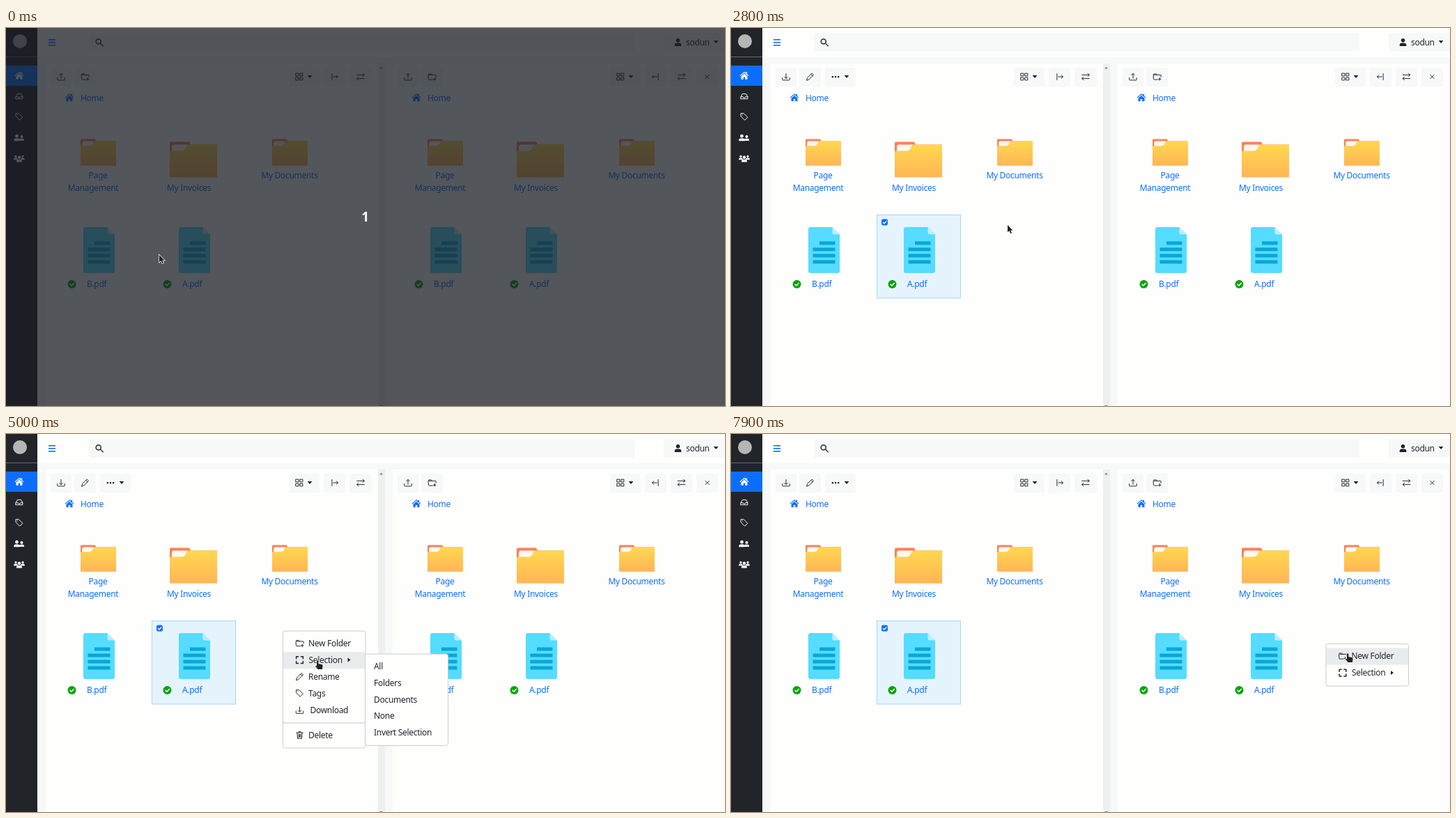
An HTML page for the animation above (8 s loop, 1032x543 px).

```html
<!DOCTYPE html>
<html lang="en">
<head>
<meta charset="utf-8">
<title>File browser</title>
<style>
  html, body { margin: 0; width: 100%; height: 100%; overflow: hidden; background: #fefefd; }
  svg { display: block; width: 100%; height: 100%; }
  text { font: 12px "Noto Sans", "Open Sans", sans-serif; letter-spacing: -.3px; }
  .count { font-size: 19px; font-weight: 600; }
</style>
</head>
<body>
<svg id="stage" viewBox="0 0 1032 543"></svg>
<script>
const LOOP = 8000, STEP = 100;
const BLUE = '#0d6efd', INK = '#212529', WHITE = '#fefefd', PALE = '#f7f8f8';
const PANEL_SHIFT = 498;

// Outline icons on a 16-unit grid
const LINES = {
  upload: 'M1 10v3.5q0 1 1 1h12q1 0 1-1V10M8 11V2M5 4.8l3-3 3 3',
  download: 'M1 10v3.5q0 1 1 1h12q1 0 1-1V10M8 2v9M5 8.5l3 3 3-3',
  folderPlus: 'M9 13.5H2.5q-1 0-1.2-1L.8 5.5q0-1 1-1h13q1 0 .9 1l-.3 3M1.2 4.2V3.5q0-1 1-1h4l2 2M13 10v5M10.5 12.5h5',
  grid: 'M1.5 1.5h5v5h-5zM9.5 1.5h5v5h-5zM1.5 9.5h5v5h-5zM9.5 9.5h5v5h-5z',
  barRight: 'M2.5 2v12M5 8h9M11 5l3 3-3 3',
  barLeft: 'M13.5 2v12M11 8H2M5 5L2 8l3 3',
  swap: 'M1 11.5h14M4 8.5l-3 3 3 3M15 4.5H1M12 1.5l3 3-3 3',
  close: 'M4.5 4.5l7 7M11.5 4.5l-7 7',
  pencil: 'M1.5 14.5l1.3-4.5L11.5 1.3l3.2 3.2L6 13.2zM9.5 3.3l3.2 3.2',
  tag: 'M1.5 2v5l7.5 7.5 5.5-5.5L7 1.5H2zM4.5 4.5h.3',
  corners: 'M1.5 5.5v-4h4M10.5 1.5h4v4M14.5 10.5v4h-4M5.5 14.5h-4v-4',
  trash: 'M1.5 3.5h13M6 3V1.5h4V3M3.3 4l.7 10.5h8L12.7 4M6 6.5V12M8 6.5V12M10 6.5V12',
  inbox: 'M1.5 9h4q.5 2 2.5 2t2.5-2h4M1.5 9l3-5.5h7l3 5.5v4h-13z',
  search: 'M11 6.5a4.7 4.7 0 1 0-9.4 0a4.7 4.7 0 0 0 9.4 0M10 10l5 5',
  check: 'M4 8.5l3 3 5.5-6'
};
const SOLIDS = {
  home: 'M8 1.5L0 8.5l1 1 7-6 7 6 1-1-3-2.6V2h-2v2zM8 5L2.5 9.8V15h4v-4h3v4h4V9.8z',
  user: 'M8 8a4 4 0 1 0 0-8a4 4 0 0 0 0 8zM1 16v-2q0-4.5 4.5-4.5h5q4.5 0 4.5 4.5v2z',
  caret: 'M3 5h10l-5 6z',
  dots: 'M1 6.5h3v3H1zM6.5 6.5h3v3h-3zM12 6.5h3v3h-3z'
};

const rect = (x, y, w, h, fill, extra = '') =>
  `<rect x="${x}" y="${y}" width="${w}" height="${h}" fill="${fill}" ${extra}/>`;
const path = (d, fill, extra = '') => `<path d="${d}" fill="${fill}" ${extra}/>`;
const at = (x, y, body, scale = 1) => `<g transform="translate(${x} ${y}) scale(${scale})">${body}</g>`;
const label = (x, y, text, fill = INK, anchor = 'start') =>
  `<text x="${x}" y="${y}" fill="${fill}" text-anchor="${anchor}">${text}</text>`;

// Icon centred on x, y
function icon(name, x, y, color = INK, size = 12, weight = 1.3) {
  const s = size / 16;
  const shape = SOLIDS[name] ? path(SOLIDS[name], color)
    : path(LINES[name], 'none', `stroke="${color}" stroke-width="${weight}" stroke-linecap="round" stroke-linejoin="round"`);
  return at(x - size / 2, y - size / 2, shape, s);
}

const button = (x, w, ...icons) => rect(x, 57, w, 27, PALE, 'rx="3"') +
  icons.map(([name, cx]) => icon(name, cx, 70, INK, name === 'caret' ? 11 : 12)).join('');

const folder = (x, y, scale) => at(x, y,
  path('M0 2q0-2 2-2h25q2 0 2.6 4H68V20H0z', '#fd8157') +
  path('M3 16V6l2-2h21v8z', '#fff8f2') +
  path('M0 15q0-2 2-2h15q4 0 6-4l1-3q1-2 4-2h40V51H0z', 'url(#gold)'), scale);

const file = (x, name) => at(x, 286,
  path('M3 0h31.500l10.500 10.500V63q0 3-3 3H3q-3 0-3-3V3q0-3 3-3z', '#55dcfe') +
  path('M34.500 0l10.500 10.500h-8q-2.500 0-2.500-2.500z', '#b9effd') +
  rect(16, 20.5, 22.5, 5, '#09a7d6') +
  [29.5, 38.5, 47.5].map(y => rect(6.5, y, 32, 5, '#09a7d6')).join('')) +
  `<circle cx="${x - 16.5}" cy="368" r="6" fill="#0aa30d"/>` +
  icon('check', x - 16.5, 368, WHITE, 10, 2.4) +
  label(x + 5, 371.5, name, BLUE);

function highlight(x, hovered, checked) {
  if (!hovered && !checked) return '';
  const [fill, edge] = hovered ? ['#d0ecfc', '#7cc0ec'] : ['#e5f3fd', '#a6d8f2'];
  return rect(x + .5, 268.5, 120, 119.5, fill, `stroke="${edge}"`) +
    rect(x + 7.5, 275, 8, 8, checked ? BLUE : WHITE, `rx="1.5" stroke="${checked ? BLUE : '#777'}"`) +
    (checked ? icon('check', x + 11.5, 279, WHITE, 9, 2.4) : '');
}

const contents = () =>
  icon('home', 91, 99.5, BLUE, 13) + label(107, 104.5, 'Home', BLUE) +
  folder(107, 159.5, .75) + folder(235, 163.5, 1) + folder(382, 159.5, .75) +
  label(132, 216, 'Page', BLUE, 'middle') + label(125, 234, 'Management', BLUE, 'middle') +
  label(262.5, 234, 'My Invoices', BLUE, 'middle') + label(407, 216, 'My Documents', BLUE, 'middle') +
  file(111, 'B.pdf') + file(248, 'A.pdf');

const createTools = button(64, 30, ['upload', 79]) + button(98, 31, ['folderPlus', 113.5]);
const selectionTools = button(64, 30, ['download', 79]) + button(98, 31, ['pencil', 113.5]) +
  button(135, 44, ['dots', 150], ['caret', 166]);

const frame = rect(0, 0, 1032, 543, PALE) +
  rect(45, 0, 987, 42, WHITE) + rect(57, 51, 477, 492, WHITE) + rect(555, 51, 475, 492, WHITE) +
  rect(534, 51, 10, 492, '#eeefef') + path('M536 58.500h5l-2.500-3zM536.500 542h4v1h-4z', '#888') +
  rect(0, 0, 45, 543, INK) + rect(0, 41, 45, 1, '#64676a') + rect(0, 54, 45, 29, BLUE) +
  '<circle cx="20" cy="19" r="10" fill="#b4b6b6"/>' +
  icon('home', 19, 68, WHITE, 13) + icon('inbox', 19, 98, WHITE, 12) + icon('tag', 19, 127.5, WHITE, 12) +
  icon('user', 15.5, 157.5, WHITE, 9.5) + icon('user', 22.5, 158, WHITE, 8) +
  icon('user', 14, 186, WHITE, 6.5) + icon('user', 24, 186, WHITE, 6.5) + icon('user', 19, 188, WHITE, 9) +
  [16, 20, 24].map(y => rect(61, y, 10, 1.6, BLUE)).join('') +
  rect(119, 7, 783, 27, PALE, 'rx="3"') + icon('search', 134, 20.5, '#444', 12, 2.3) +
  rect(944, 7, 90, 27, PALE, 'rx="3"') + icon('user', 964.5, 20.5, INK, 11) +
  label(976, 25, 'sodun') + icon('caret', 1019, 20, INK, 11) +
  button(406, 44, ['grid', 421], ['caret', 436]) + button(456, 31, ['barRight', 472]) + button(493, 32, ['swap', 509]) +
  button(867, 44, ['grid', 882], ['caret', 897]) + button(917, 31, ['barLeft', 932]) +
  button(954, 31, ['swap', 969.5]) + button(991, 31, ['close', 1006.5]) +
  at(PANEL_SHIFT, 0, createTools);

const defs = '<defs><linearGradient id="gold" x2="0" y2="1"><stop stop-color="#ffd84f"/>' +
  '<stop offset="1" stop-color="#ffb556"/></linearGradient></defs>';

// [icon, text, text x, centre y]
const MENU_ROWS = [
  ['folderPlus', 'New Folder', 36.5, 17.5], ['corners', 'Selection', 37, 41.5], ['pencil', 'Rename', 36.5, 65.5],
  ['tag', 'Tags', 36.5, 89.5], ['download', 'Download', 39, 113.5], ['trash', 'Delete', 36.5, 149.5]
];
const SUBMENU_ROWS = ['All', 'Folders', 'Documents', 'None', 'Invert Selection'];
const MENUS = [
  { from: 1800, to: 2800, x: 271, y: 303.5, rows: 6 },
  { from: 3100, to: 5700, x: 397.5, y: 283, rows: 6 },
  { from: 7000, to: LOOP, x: 854, y: 301.5, rows: 2 }
];
const sheet = (x, y, w, h) => rect(x, y, w, h, WHITE, 'rx="3" stroke="#cbcccd"');

function menuState(menu, cursor) {
  const x = cursor.x - menu.x, y = cursor.y - menu.y;
  const inSub = x > 118 && x < 237 && y > 33 && y < 164;
  const row = inSub ? 1 : x > 0 && x <= 118 && y >= 6 ? Math.floor((y - 6) / 24) : -1;
  return { row, subRow: inSub ? Math.floor((y - 39) / 24) : -1 };
}

function drawMenu(menu, { row, subRow }) {
  const full = menu.rows > 2;
  let out = sheet(0, 0, 118.5, full ? 168 : 60.5);
  if (row >= 0 && row < 5) out += rect(.5, 6 + row * 24, 117.5, 24, '#e9ecec');
  for (const [name, text, x, y] of MENU_ROWS.slice(0, menu.rows))
    out += icon(name, 24, y, INK, 12, name === 'corners' ? 2 : 1.3) + label(x, y + 4.2, text);
  out += path('M93 38.500l4 3-4 3z', INK);
  if (full) out += rect(0, 131.5, 118.5, 1, '#c2c4c5');
  if (row === 1) {
    out += sheet(118, 33, 119, 131.5);
    if (subRow >= 0) out += rect(118.5, 39 + subRow * 24, 118, 24, '#e9ecec');
    out += SUBMENU_ROWS.map((text, i) => label(130.5, 55 + i * 23.8, text)).join('');
  }
  return at(menu.x, menu.y, out);
}

// Pointer route: time, x, y
const ROUTE = [
  [0, 220, 326], [200, 220, 326], [800, 220, 279], [1300, 220, 279], [1800, 270, 303], [2000, 270, 303],
  [2600, 397, 283], [3300, 397, 283], [3500, 406, 320], [3700, 500, 328], [3900, 560, 356], [4100, 530, 332],
  [4300, 475, 308], [4400, 438, 300], [4600, 438, 301], [4800, 446, 325], [5100, 446, 325], [5500, 404, 269],
  [5900, 404, 269], [6000, 550, 290], [6100, 690, 310], [6300, 800, 312], [6700, 854, 302], [7200, 854, 302],
  [7400, 872, 342], [7600, 880, 344], [7900, 884, 315], [LOOP, 884, 315]
];
function pointerAt(t) {
  const i = ROUTE.findIndex(key => key[0] > t);
  const [t0, x0, y0] = ROUTE[i - 1], [t1, x1, y1] = ROUTE[i];
  const k = (t - t0) / (t1 - t0);
  return { x: x0 + (x1 - x0) * k, y: y0 + (y1 - y0) * k };
}
const ARROW = 'M0 0v10.500l2.500-2.200 1.800 4 1.800-.8-1.800-3.800h3.200z';
const HAND = 'M0 1q1.200-1.800 2.400 0v4l5 1q1.300.4 1.200 2l-.6 5H1.500L-2 8.500q.6-1.600 2 0z';
const drawPointer = ({ x, y }, isHand) => at(x, y,
  path(isHand ? HAND : ARROW, '#222', 'stroke="#fff" stroke-width="1.4" paint-order="stroke"'));

function scene(t) {
  const cursor = pointerAt(t);
  const counting = t < 100, checked = t >= 1000;
  const over = x => !counting && cursor.x >= x && cursor.x <= x + 121 && cursor.y >= 268 && cursor.y <= 388;
  const menu = MENUS.find(m => t >= m.from && t < m.to);
  const state = menu && menuState(menu, cursor);
  return defs + frame + (checked ? selectionTools : createTools) +
    highlight(209, over(209), checked) + highlight(569.5, over(569.5), false) + highlight(706.5, over(706.5), false) +
    contents() + at(PANEL_SHIFT, 0, contents()) +
    (menu ? drawMenu(menu, state) : '') +
    (counting ? rect(0, 0, 1032, 543, 'rgba(26,30,36,.75)') +
      '<text class="count" x="515.5" y="278" fill="#fff" text-anchor="middle">1</text>' : '') +
    drawPointer(cursor, menu && state.row >= 0);
}

const stage = document.getElementById('stage');
const start = performance.now();
let shown = -1;
function tick() {
  const t = Math.floor((performance.now() - start) % LOOP / STEP) * STEP;
  if (t !== shown) stage.innerHTML = scene(shown = t);
  requestAnimationFrame(tick);
}
tick();
</script>
</body>
</html>
```
